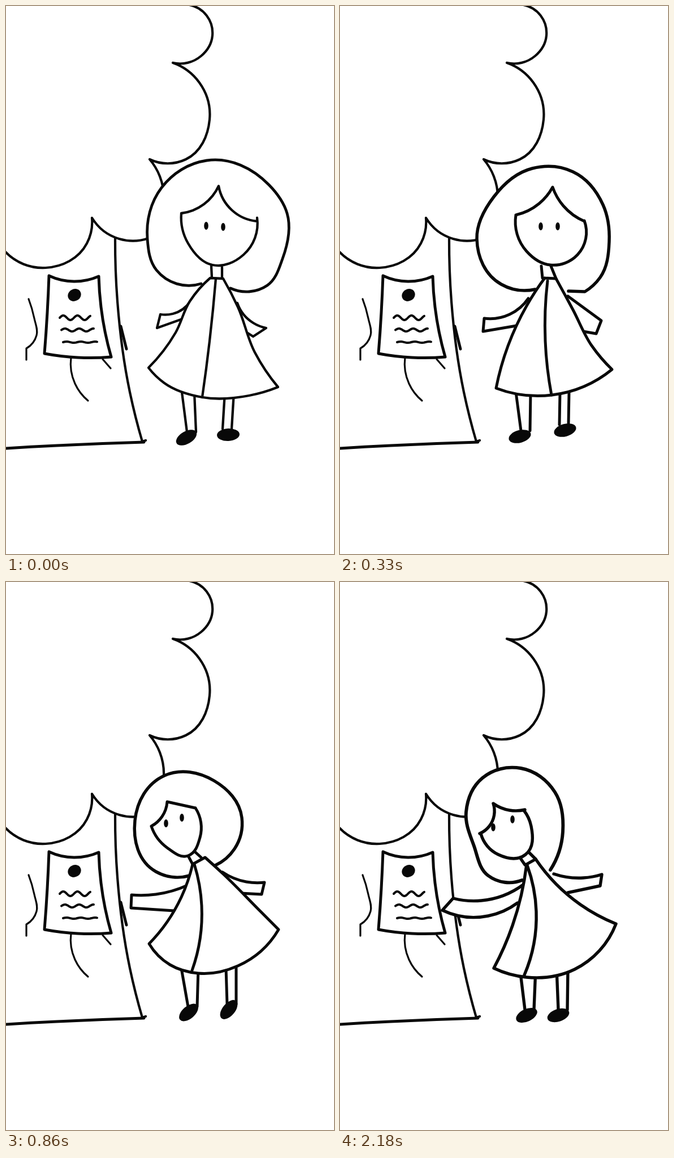
These frames come from a looping animation (580x965 px, 2.97 s). An HTML page with a canvas:

```html
<!DOCTYPE html>
<html lang="en">
<head>
<meta charset="utf-8">
<title>Reading the notice</title>
<style>
  html, body { margin: 0; width: 100%; height: 100%; overflow: hidden; background: #fff; }
  canvas { display: block; }
</style>
</head>
<body>
<canvas width="580" height="965"></canvas>
<script>
const LOOP = 2970, STEP = 330;
const ctx = document.querySelector('canvas').getContext('2d');
const INK = '#080808';

const angle = (a, b) => Math.atan2(b[1] - a[1], b[0] - a[0]);

// Headings along a run of points: each inner one is tangent to the circle
// through its neighbours, the outer ones continue that circle.
function headings(points) {
  const n = points.length - 1;
  if (n === 1) return Array(2).fill(angle(...points));
  const result = points.map((p, i) => i && i < n
    ? angle(points[i - 1], p) + angle(p, points[i + 1]) - angle(points[i - 1], points[i + 1]) : 0);
  result[0] = 2 * angle(points[0], points[1]) - result[1];
  result[n] = 2 * angle(points[n - 1], points[n]) - result[n - 1];
  return result;
}

function addRun(path, points) {
  const heading = headings(points);
  for (let i = 1; i < points.length; i++) {
    const a = points[i - 1], b = points[i], chord = angle(a, b);
    const handle = (p, h, sign) => {
      const length = Math.hypot(b[0] - a[0], b[1] - a[1]) / 3 / Math.cos((h - chord) / 2) ** 2;
      return [p[0] + sign * length * Math.cos(h), p[1] + sign * length * Math.sin(h)];
    };
    path.bezierCurveTo(...handle(a, heading[i - 1], 1), ...handle(b, heading[i], -1), ...b);
  }
}

// Key points of a smooth stroke; "/" marks a corner, ";" starts a new stroke.
function makePath(text) {
  const path = new Path2D();
  for (const stroke of text.split(';')) {
    let last = null;
    for (const run of stroke.split('/')) {
      const points = run.trim().split(' ').map(pair => pair.split(',').map(Number));
      if (last) points.unshift(last);
      else path.moveTo(...points[0]);
      addRun(path, points);
      last = points.at(-1);
    }
  }
  return path;
}

function line(text, width, fill) {
  const path = makePath(text);
  if (fill) {
    ctx.fillStyle = fill;
    ctx.fill(path);
  }
  ctx.lineWidth = width;
  ctx.stroke(path);
}

function blob(x, y, rx, ry, tilt = 0) {
  ctx.fillStyle = INK;
  ctx.beginPath();
  ctx.ellipse(x, y, rx, ry, tilt * Math.PI / 180, 0, 2 * Math.PI);
  ctx.fill();
}

function drawScene() {
  line('324,-2 365,52 345,88 295,100 / 342,135 360,200 318,270 254,270 / 272,300 279,342', 4.2);
  line('-2,432 70,461 143,418 152,373 / 200,410 252,409', 4.2);
  line('193,410 197,520 219,680 241,767 / 247,765', 4.2);
  line('203,564 213,604; -2,779 90,774 244,768', 5);
  line('76,475 120,485 164,476 / 168,530 186,618 / 127,619 68,612 / 73,540 76,475', 5);
  line('40,516 50,550 54,580 36,603 / 36,623; 115,619 122,665 145,695; 171,622 185,638', 3.2);
  blob(121, 509, 12, 10.5, -30);
  for (let row = 0; row < 3; row++) drawScribble(95 + 3 * row, 549 + 21.5 * row, 54 + 3 * row, 4 - 1.5 * row);
}

function drawScribble(x, y, width, height) {
  ctx.lineWidth = 4;
  ctx.beginPath();
  for (let dx = 0; dx <= width; dx++) ctx.lineTo(x + dx, y - height * Math.sin(dx / 4));
  ctx.stroke();
}

// Each leg: hip x, ankle x, half width at the hip, then the shoe's x, y and tilt.
const poses = [
  {
    pen: 4.3,
    hair: '345,489 266,465 250,410 275,320 355,272 465,315 497,365 489,445 462,492 430,503 397,497',
    face: '310,365 322,418 365,456 420,438 444,373; 310,365 350,349 376,317 / 400,360 444,379',
    eyes: [[354, 387], [384, 389]],
    neck: '363,458 364,478; 382,460 382,480',
    dress: '361,479 325,520 300,575 252,637 / 280,664 347,689 430,686 481,671 / 440,610 410,530 384,480 / 361,479',
    seam: '371,480 360,590 347,689',
    arms: '326,520 295,542 273,543 / 267,567 / 312,551; 409,523 437,558 460,567 / 437,582 / 426,575',
    legs: [[322, 328, 11, 319, 760, -30], [395, 391, 8, 393, 755, -3]]
  },
  {
    pen: 5,
    hair: '345,499 285,490 242,410 272,336 340,286 412,292 465,350 476,415 460,478 433,503 / 404,502',
    face: '311,368 330,432 372,456 420,438 432,378; 311,368 352,348 376,319 / 395,352 432,379',
    eyes: [[355, 388], [385, 388]],
    neck: '356,458 358,479; 373,458 382,480',
    dress: '362,479 330,528 276,673 / 375,685 481,640 / 445,598 412,535 382,480 / 362,479',
    seam: '367,484 363,590 374,685',
    arms: '333,515 300,543 255,550 / 253,573 / 318,562; 403,511 462,554 / 453,577 / 430,573',
    legs: [[324, 328, 13, 318, 758, -15], [397, 396, 8, 398, 747, -15]]
  },
  {
    pen: 5,
    hair: '325,517 265,510 228,420 280,341 368,350 417,415 404,470 370,499',
    face: '257,430 285,468 322,482 343,450 335,398; 257,430 276,413 285,387 / 335,398',
    eyes: [[283, 425], [311, 415]],
    neck: '323,484 330,497; 334,475 345,485',
    dress: '330,497 310,555 253,637 / 290,674 340,689 410,676 482,612 / 450,580 385,515 352,485 / 330,497',
    seam: '333,497 346,570 329,684',
    arms: '321,534 265,550 222,551 / 221,574 / 298,579; 383,511 425,528 457,529 / 452,550 / 415,548',
    legs: [[325, 330, 15, 323, 758, -40], [398, 399, 9, 394, 753, -50]]
  },
  {
    pen: 5.4,
    hair: '322,525 262,517 237,465 223,405 252,345 320,328 380,370 394,440 372,507',
    face: '249,443 280,480 328,480 338,430 325,402; 247,443 264,430 271,390 / 300,402 327,401',
    eyes: [[271, 432], [305, 418]],
    neck: '318,485 327,498; 333,475 346,488',
    dress: '330,497 305,605 272,680 / 330,696 415,682 488,602 / 425,568 346,488 / 330,497',
    seam: '331,499 347,580 326,692',
    arms: '324,533 250,561 200,557 / 181,578 / 262,588 314,565; 378,514 430,521 463,515 / 460,535 / 403,547',
    legs: [[332, 335, 14, 330, 763, -25], [393, 394, 10, 386, 763, -18]]
  }
];

function drawGirl({ pen, hair, face, eyes, neck, dress, seam, arms, legs }) {
  for (const [hip, ankle, half, shoeX, shoeY, tilt] of legs) {
    for (const side of [-1, 1]) line(`${hip + side * half},680 ${ankle + side * 8},${shoeY - 10}`, pen);
    blob(shoeX, shoeY, 20, 11, tilt);
  }
  line(arms, pen, '#fff');
  line(hair, pen + 0.5, '#fff');
  line(dress, pen, '#fff');
  line(`${seam}; ${neck}; ${face}`, pen);
  for (const [x, y] of eyes) blob(x, y, 3.8, 7);
}

const startTime = performance.now();
function draw() {
  const time = (performance.now() - startTime) % LOOP;
  const current = Math.min(Math.floor(time / STEP), poses.length - 1);
  ctx.fillStyle = '#fff';
  ctx.fillRect(0, 0, 580, 965);
  ctx.strokeStyle = INK;
  ctx.lineCap = ctx.lineJoin = 'round';
  drawScene();
  drawGirl(poses[current]);
  requestAnimationFrame(draw);
}
draw();
</script>
</body>
</html>
```
